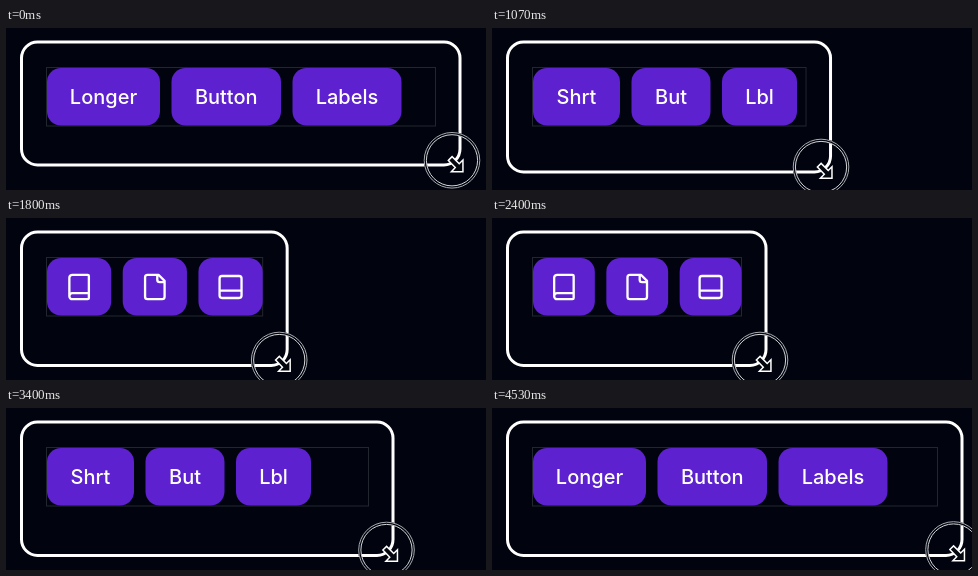
An HTML page with a canvas for the animation above (4590 ms loop, 480x162 px).

```html
<!DOCTYPE html>
<html lang="en">
<head>
<meta charset="utf-8">
<title>Resizable button group</title>
<style>
  html, body { margin: 0; width: 100%; height: 100%; overflow: hidden; background: #01040e; }
  canvas { display: block; width: 480px; height: 162px; }
</style>
</head>
<body>
<canvas id="stage"></canvas>
<script>
const W = 480, H = 162, LOOP = 4590, STEP = 200 / 3;
const canvas = document.getElementById('stage');
const ctx = canvas.getContext('2d');
const dpr = window.devicePixelRatio || 1;
canvas.width = W * dpr;
canvas.height = H * dpr;

// time, box right, box bottom, pointer x, pointer y
const KEYS = [
  [0, 455.5, 138.5, 446, 132.3],
  [600, 385, 139.8, 373.5, 134],
  [1067, 340, 145.5, 329, 139],
  [1467, 303, 149, 292, 142],
  [1600, 293.5, 149, 282.5, 142],
  [2133, 272, 149, 264.5, 142],
  [2333, 272, 149, 264.5, 142],
  [2400, 275.5, 149, 268, 142],
  [2867, 334.5, 149, 327, 142],
  [3400, 388.5, 149, 380.5, 142],
  [3867, 441, 149, 432.5, 142],
  [4533, 471.5, 149, 461.5, 141.5]
];

const LABELS = [
  { words: ['Longer', 'Button', 'Labels'], widths: [113, 109.5, 109] },
  { words: ['Shrt', 'But', 'Lbl'], widths: [87, 79, 75] }
];
const LEFT = 41, TOP = 40, GAP = 11.5, BTN_H = 57.5;

const ICONS = [
  'M4 19.5v-15A2.5 2.5 0 0 1 6.5 2H19a1 1 0 0 1 1 1v18a1 1 0 0 1-1 1H6.5a1 1 0 0 1 0-5H20',
  'M15 2H6a2 2 0 0 0-2 2v16a2 2 0 0 0 2 2h12a2 2 0 0 0 2-2V7ZM14 2v4a2 2 0 0 0 2 2h4',
  'M5 3h14a2 2 0 0 1 2 2v14a2 2 0 0 1-2 2H5a2 2 0 0 1-2-2V5a2 2 0 0 1 2-2ZM3 15h18'
].map(d => new Path2D(d));

const ARROW = new Path2D('M-6.6 -3.9L-3.9 -6.6L3.2 0.5L6.2 -2.5V6.6H-2.9L0.3 3.2Z');

// Monotone cubic interpolation, so holds stay flat.
function sample(t, col) {
  const slope = i => (KEYS[i + 1][col] - KEYS[i][col]) / (KEYS[i + 1][0] - KEYS[i][0]);
  const last = KEYS.length - 1;
  const tangent = i => {
    if (i === 0) return slope(0);
    if (i === last) return slope(last - 1);
    const a = slope(i - 1), b = slope(i);
    return a * b <= 0 ? 0 : 2 * a * b / (a + b);
  };
  let i = 0;
  while (i < last - 1 && t >= KEYS[i + 1][0]) i++;
  const span = KEYS[i + 1][0] - KEYS[i][0];
  const u = Math.min(1, (t - KEYS[i][0]) / span);
  const v = 1 - u;
  return KEYS[i][col] * (1 + 2 * u) * v * v + KEYS[i + 1][col] * (3 - 2 * u) * u * u
    + span * u * v * (tangent(i) * v - tangent(i + 1) * u);
}

function roundRect(x, y, w, h, r) {
  ctx.beginPath();
  ctx.roundRect(x, y, w, h, r);
}

function ring(x, y, r, color, width) {
  ctx.beginPath();
  ctx.arc(x, y, r, 0, Math.PI * 2);
  ctx.strokeStyle = color;
  ctx.lineWidth = width;
  ctx.stroke();
}

function drawIcon(path, x, y) {
  ctx.save();
  ctx.translate(x, y);
  ctx.scale(1.22, 1.22);
  ctx.translate(-12, -12);
  ctx.strokeStyle = '#fff';
  ctx.lineWidth = 1.9;
  ctx.lineCap = ctx.lineJoin = 'round';
  ctx.stroke(path);
  ctx.restore();
}

function drawButtons(right) {
  const room = right - LEFT;
  const total = set => set.widths.reduce((a, b) => a + b, 2 * GAP);
  const set = LABELS.find(s => total(s) <= room);
  const even = (room - 2 * GAP) / 3;
  let x = LEFT;
  for (let i = 0; i < 3; i++) {
    const w = set ? set.widths[i] : even;
    const cx = x + w / 2;
    roundRect(x, TOP, w, BTN_H, 14);
    ctx.fillStyle = '#5e21d0';
    ctx.fill();
    if (set) {
      ctx.fillStyle = '#fff';
      ctx.fillText(set.words[i], cx, 76);
    } else {
      drawIcon(ICONS[i], cx, 69);
    }
    x += w + GAP;
  }
}

function drawPointer(x, y) {
  ring(x, y, 26.8, '#01040e', 3);
  ring(x, y, 27.8, '#a9abb0', 1);
  ring(x, y, 25.6, '#d4d5d8', 1);
  ctx.save();
  ctx.translate(x + 4, y + 4);
  ctx.lineJoin = 'miter';
  ctx.strokeStyle = '#fff';
  ctx.lineWidth = 3;
  ctx.stroke(ARROW);
  ctx.fillStyle = '#05070f';
  ctx.fill(ARROW);
  ctx.restore();
}

function draw(t) {
  const [right, bottom, px, py] = [1, 2, 3, 4].map(col => sample(t, col));
  ctx.setTransform(dpr, 0, 0, dpr, 0, 0);
  ctx.fillStyle = '#01040e';
  ctx.fillRect(0, 0, W, H);
  ctx.font = '500 20px Inter, "Noto Sans", sans-serif';
  ctx.textAlign = 'center';

  roundRect(15.5, 14, right - 17, bottom - 15.5, 16);
  ctx.strokeStyle = '#fff';
  ctx.lineWidth = 3;
  ctx.stroke();

  const inner = right - 26;
  ctx.strokeStyle = '#22262e';
  ctx.lineWidth = 1;
  ctx.strokeRect(40.5, 39.5, inner - 40.5, 58.5);
  drawButtons(inner);
  drawPointer(px, py);
}

function tick() {
  const t = performance.now() % LOOP;
  draw(Math.floor((t + 3.4) / STEP) * STEP);
  requestAnimationFrame(tick);
}
tick();
</script>
</body>
</html>
```
